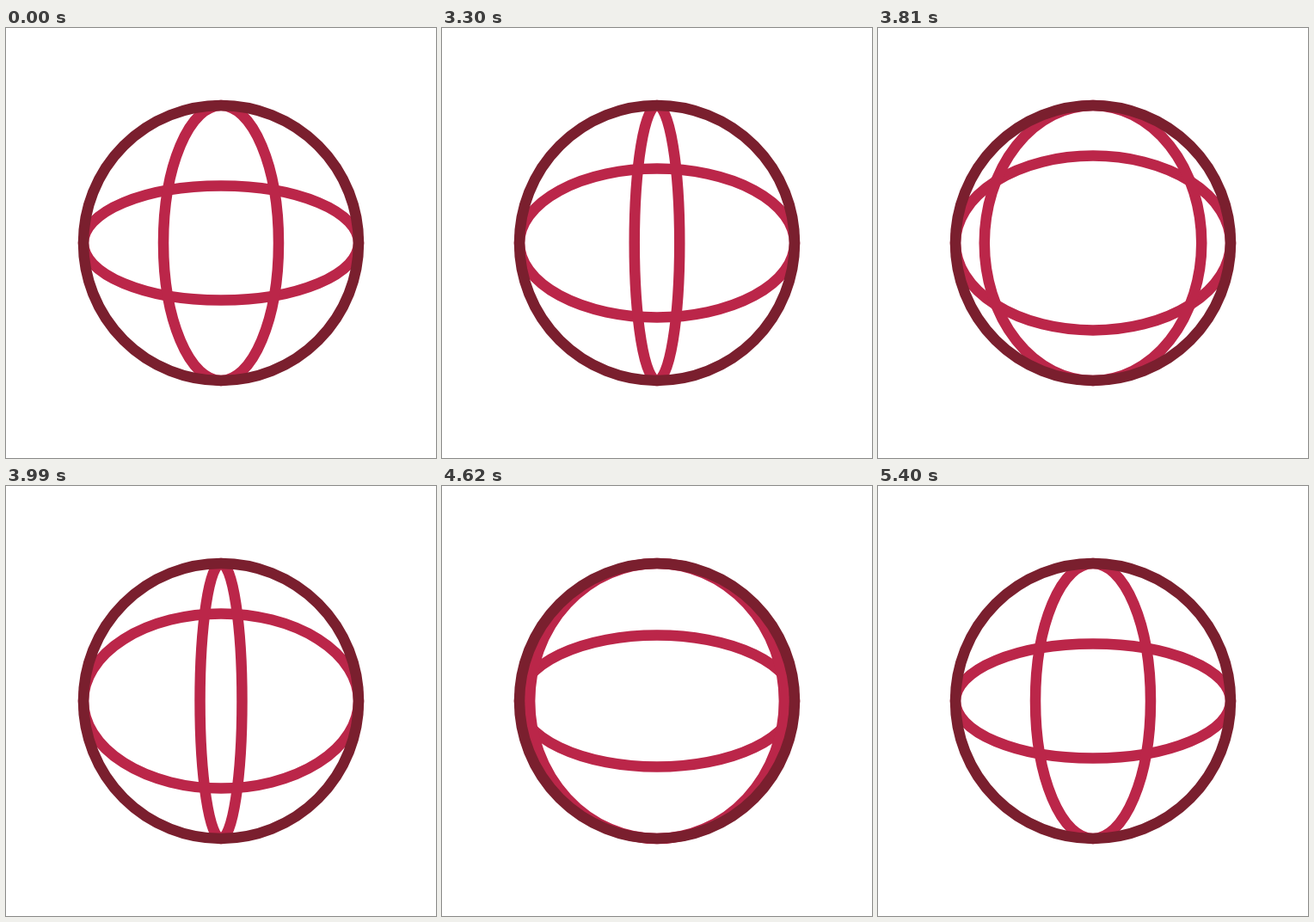
Animation of 500x500 px, one loop 5.49 s. Source, as an HTML page:

```html
<!DOCTYPE html>
<html lang="en">
<head>
<meta charset="utf-8">
<title>Turning globe</title>
<style>
  html, body { margin: 0; width: 100%; height: 100%; overflow: hidden; background: #fff; }
  svg { display: block; width: 100%; height: 100%; }
</style>
</head>
<body>
<svg viewBox="0 0 500 500" fill="none" stroke="#bb2649" stroke-width="12.5">
  <ellipse id="parallel" cx="250" cy="250" rx="160" ry="66.5"/>
  <ellipse id="meridian" cx="250" cy="250" rx="67" ry="160"/>
  <circle cx="250" cy="250" r="160" stroke="#7a1f2e"/>
</svg>
<script>
const LOOP = 5490, START = 3000, STEP = 30;
const RADIUS = 160, REST_ANGLE = 24.75 * Math.PI / 180;
const REST_TILT = 66.5, PEAK_TILT = 101.7;
const parallel = document.getElementById('parallel');
const meridian = document.getElementById('meridian');

// Cubic Bézier easing with control points (x1, 0) and (x2, 1).
function ease(x, x1, x2) {
  if (x <= 0) return 0;
  if (x >= 1) return 1;
  let low = 0, high = 1, s;
  for (let i = 0; i < 30; i++) {
    s = (low + high) / 2;
    const r = 1 - s;
    if (3 * x1 * s * r * r + 3 * x2 * s * s * r + s ** 3 < x) low = s;
    else high = s;
  }
  return s * s * (3 - 2 * s);
}

function draw(now) {
  const t = Math.floor((now % LOOP) / STEP) * STEP - START;

  const angle = REST_ANGLE - 2 * Math.PI * ease(t / 2210, 0.21, 0.57);
  meridian.setAttribute('rx', RADIUS * Math.abs(Math.sin(angle)));

  const tilt = ease(t / 930, 0.25, 0.19) - ease((t - 930) / 1470, 0.44, 0.205);
  parallel.setAttribute('ry', REST_TILT + (PEAK_TILT - REST_TILT) * tilt);
}

const begin = performance.now();
function tick() {
  draw(performance.now() - begin);
  requestAnimationFrame(tick);
}
tick();
</script>
</body>
</html>
```
